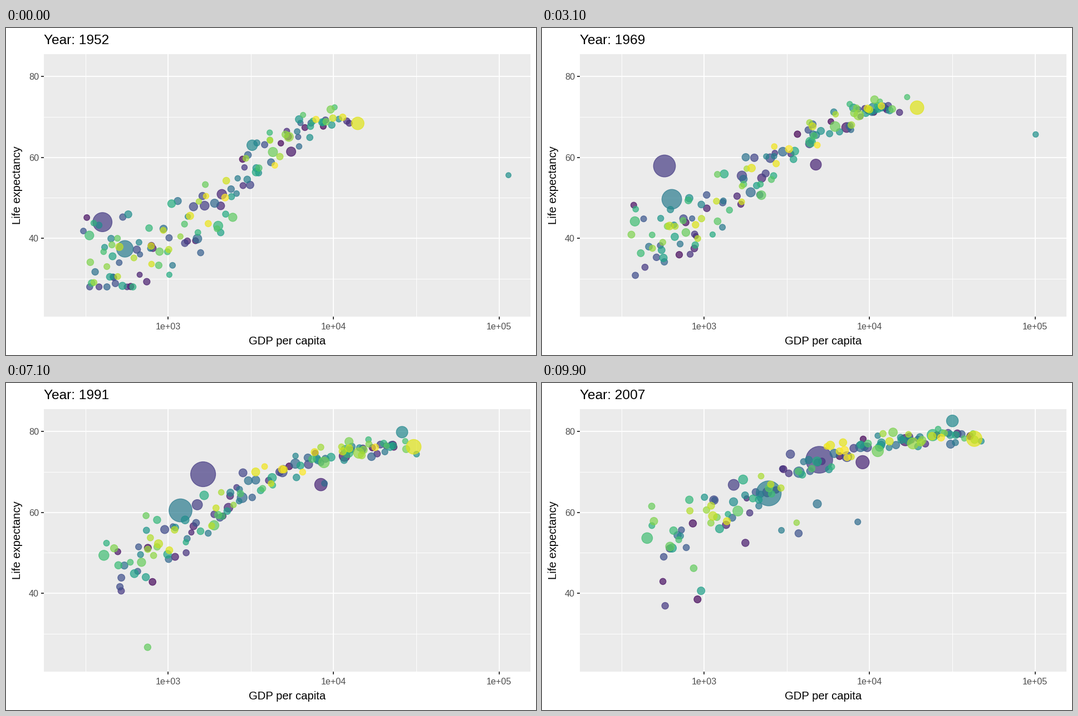
Animation of 952 by 588 pixels, one loop 10000 ms. Source, as a matplotlib script:

```python
import numpy as np
import matplotlib.pyplot as plt
from matplotlib.animation import FuncAnimation

W, H = 952, 588
PX = 0.72               # points per pixel at 100 dpi
DPI_SCALE = 132 / 72    # chart points to pixels
N, KEYS, STEP = 142, 12, 9
FRAMES = (KEYS - 1) * STEP + 1
LEFT, RIGHT, TOP, BOTTOM = 68.2, 941.6, 46.7, 519.0
X0, X1, Y0, Y1 = 2.2485, 5.1887, 20.649, 85.553

plt.rcParams["font.family"] = "Liberation Sans"
rng = np.random.default_rng(7)
keys = np.arange(KEYS)
age = keys[:, None] / (KEYS - 1)


def shuffled_rank(score):
    """Evenly spread ranks in (0, 1), in the order of the scores."""
    return (np.argsort(np.argsort(score)) + 0.5) / len(score)


def cloud():
    """Nations grow richer; life expectancy follows income on an S-curve."""
    first = rng.random(N)
    last = first + rng.normal(0, 0.17, N)
    start = 2.5 + 1.6 * shuffled_rank(first) ** 1.15
    end = 2.65 + 2.0 * shuffled_rank(last)
    gdp = start + (end - start) * age + rng.normal(0, 0.02, (KEYS, N))

    low, high = 34 + 12 * age, 71 + 8.5 * age
    middle, width = 3.4 - 0.2 * age, 0.2 + 0.15 * age
    s = 1 / (1 + np.exp((middle - gdp) / width))
    luck = np.clip(rng.normal(0, 1, (2, N)), -1.8, 1.8)
    luck = luck[0] * (1 - 0.6 * age) + luck[1] * 0.6 * age
    life = low + (high - low) * s + luck * (1.5 + 4.5 * (1 - s))
    # a few middling nations fall back in the last decades
    struck = (rng.random(N) < 0.15) & (end < 4.1)
    life -= 15 * struck * np.clip((age - 0.65) / 0.3, 0, 1)

    pop = 10 ** (np.clip(rng.normal(0.65, 0.5, N), -1, 1.7) + 0.35 * age)
    return gdp, np.clip(life, 28, 82.3), pop


def curve(values):
    """Smooth path through the first, middle and last key year."""
    return np.polyval(np.polyfit((0, 6, 11), values, 2), keys)


def lead(i, people, income, years):
    gdp[:, i] = curve(np.log10(income))
    life[:, i] = curve(years)
    pop[:, i] = np.linspace(*people, KEYS)


def shock(i, when, width, d_gdp, d_life):
    pulse = np.exp(-((keys - when) / width) ** 2)
    gdp[:, i] += d_gdp * pulse
    life[:, i] += d_life * pulse


gdp, life, pop = cloud()
lead(24, (556, 1319), (400, 962, 4959), (44, 65.5, 73))
lead(58, (372, 1110), (547, 856, 2452), (37.4, 56.6, 64.7))
lead(134, (158, 301), (13990, 25010, 42952), (68.4, 74.7, 78.2))
lead(66, (86, 127), (3217, 19384, 31656), (63, 77.1, 82.6))
lead(14, (57, 190), (2109, 7031, 9066), (50.9, 63.3, 72.4))
lead(71, (0.16, 2.5), (108382, 31354, 47307), (55.6, 71.3, 77.6))
lead(107, (2.5, 8.9), (493, 882, 863), (40, 46.2, 46.2))
shock(24, 2, 0.5, 0, -8.2)
shock(71, 3.4, 2, 0.4, 0)
shock(107, 8.25, 0.8, -0.11, -24.6)
size = 2 + 10 * np.sqrt(np.clip((pop - 0.06) / 1318.6, 0, 1))

fig = plt.figure(figsize=(W / 100, H / 100), dpi=100, facecolor="white")
ax = fig.add_axes([LEFT / W, 1 - BOTTOM / H, (RIGHT - LEFT) / W, (BOTTOM - TOP) / H],
                  facecolor="#EBEBEB")
ax.set(xlim=(X0, X1), ylim=(Y0, Y1), xticks=(3, 4, 5), yticks=(40, 60, 80))
ax.set_xticks((2.5, 3.5, 4.5), minor=True)
ax.set_yticks((30, 50, 70), minor=True)
ax.set_axisbelow(True)
ax.grid(which="major", color="white", lw=1.9 * PX)
ax.grid(which="minor", color="white", lw=0.95 * PX)
ax.tick_params(which="major", length=5 * PX, width=1.9 * PX, color="#333333",
               labelbottom=False, labelleft=False)
ax.tick_params(which="minor", length=0)
ax.spines[:].set_visible(False)


def label(x, y, text, px, color="black", **kw):
    kw.setdefault("va", "baseline")
    return fig.text(x / W, 1 - y / H, text, fontsize=px * PX, color=color, **kw)


for v in (3, 4, 5):
    x = LEFT + (v - X0) / (X1 - X0) * (RIGHT - LEFT)
    label(x, 541.8, f"1e+0{v}", 16.1, "#4D4D4D", ha="center")
for v in (40, 60, 80):
    y = TOP + (Y1 - v) / (Y1 - Y0) * (BOTTOM - TOP)
    label(59, y + 6, str(v), 16.1, "#4D4D4D", ha="right")
label((LEFT + RIGHT) / 2, 569, "GDP per capita", 20.3, ha="center")
label(30.5, (TOP + BOTTOM) / 2, "Life expectancy", 20.3, rotation=90, ha="right", va="center")
title = label(LEFT, 28.6, "", 24.5, ha="left")

shade = plt.cm.viridis(np.linspace(0, 1, N), alpha=0.7)
dots = ax.scatter(gdp[0], life[0], c=shade, edgecolors=shade, lw=1.29 * PX, zorder=3)


def draw(frame):
    k = min(frame // STEP, KEYS - 2)
    t = frame / STEP - k
    x, y, s = (v[k] * (1 - t) + v[k + 1] * t for v in (gdp, life, size))
    dots.set_offsets(np.column_stack((x, y)))
    diameter = 0.75 * (2.845 * s + 0.94) * DPI_SCALE * PX
    dots.set_sizes(diameter ** 2)
    title.set_text(f"Year: {round(1952 + 55 * frame / (FRAMES - 1))}")
    return dots, title


anim = FuncAnimation(fig, draw, frames=FRAMES, interval=100, repeat=True)
plt.show()
```
